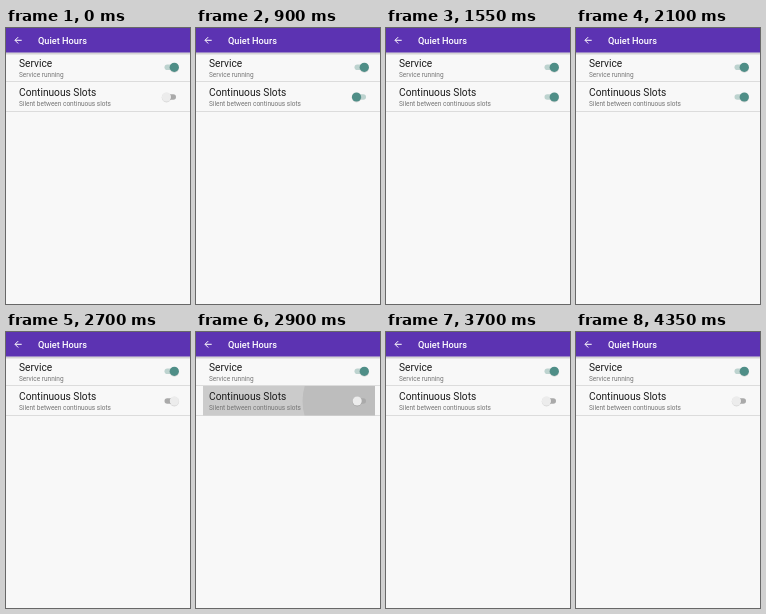
An HTML page that plays this animation: 184x276 px, repeating every 4800 ms.

```html
<!DOCTYPE html>
<html>
<head>
<meta charset="utf-8">
<style>
  html, body { margin: 0; width: 100%; height: 100%; overflow: hidden; background: #f8f8f8; }
  svg { display: block; width: 184px; height: 276px; font-family: Roboto, sans-serif; }
  .title { font-size: 9.2px; font-weight: 500; fill: #fff; }
  .name { font-size: 10.2px; fill: #1c1c1c; }
  .note { font-size: 6.5px; fill: #757575; }
</style>
</head>
<body>
<svg viewBox="0 0 184 276">
  <defs>
    <linearGradient id="shade" x2="0" y2="1">
      <stop stop-color="#000" stop-opacity=".22"/>
      <stop offset="1" stop-color="#000" stop-opacity="0"/>
    </linearGradient>
    <clipPath id="row"><rect x="7" y="54" width="172" height="29.5"/></clipPath>
  </defs>
  <rect width="184" height="276" fill="#f8f8f8"/>
  <rect y="24.5" width="184" height="3" fill="url(#shade)"/>
  <rect width="184" height="24.5" fill="#5c33b2"/>
  <path d="M15.7 12.3H9.2M12.2 9.1L9 12.3l3.2 3.2" fill="none" stroke="#fff"/>
  <path d="M0 53.5H184M0 83.5H184" stroke="#dcdcdc"/>
  <g clip-path="url(#row)">
    <rect id="press" x="7" y="54" width="172" height="29.5" opacity="0"/>
    <circle id="ripple" cx="160" cy="69" opacity="0"/>
  </g>
  <text class="title" x="32" y="15.5">Quiet Hours</text>
  <text class="name" x="13" y="38.6">Service</text>
  <text class="note" x="13" y="48.5">Service running</text>
  <text class="name" x="13" y="68.4">Continuous Slots</text>
  <text class="note" x="13" y="78.2">Silent between continuous slots</text>
  <g id="service"></g>
  <g id="slots"></g>
</svg>
<script>
const LOOP = 4800, TURN_ON = 900, TURN_OFF = 2700;
const byId = id => document.getElementById(id);
const clamp = v => Math.max(0, Math.min(1, v));
const ease = v => (1 - Math.cos(Math.PI * clamp(v))) / 2;

function makeSwitch(id, y) {
  byId(id).innerHTML = `<rect x="158.5" y="${y - 2.8}" width="11.5" height="5.6" rx="2.8"/>
    <circle cy="${y + .6}" r="4.8" fill="#000" opacity=".13"/><circle cy="${y}" r="4.6"/>`;
  const [track, shadow, thumb] = byId(id).children;
  return (on, slide) => {
    track.setAttribute("fill", on ? "#bdd3cf" : "#aaa");
    thumb.setAttribute("fill", on ? "#4f8e87" : "#ececec");
    for (const disc of [shadow, thumb]) disc.setAttribute("cx", 160.5 + 7.8 * slide);
  };
}

const setService = makeSwitch("service", 39.3);
const setSlots = makeSwitch("slots", 69);
setService(true, 1);

function render(t) {
  const slide = ease((t - TURN_ON) / 250) - ease((t - TURN_OFF) / 250);
  setSlots(t >= TURN_ON && t < TURN_OFF, slide);

  const since = t - (t < TURN_OFF ? TURN_ON : TURN_OFF);
  const fade = clamp(since / 120) * clamp((520 - since) / 240);
  byId("press").setAttribute("opacity", .18 * fade);
  byId("ripple").setAttribute("opacity", .07 * fade);
  byId("ripple").setAttribute("r", 160 * clamp(since / 450) ** 1.36);
}

function tick(now) {
  render(now % LOOP);
  requestAnimationFrame(tick);
}
requestAnimationFrame(tick);
</script>
</body>
</html>
```
